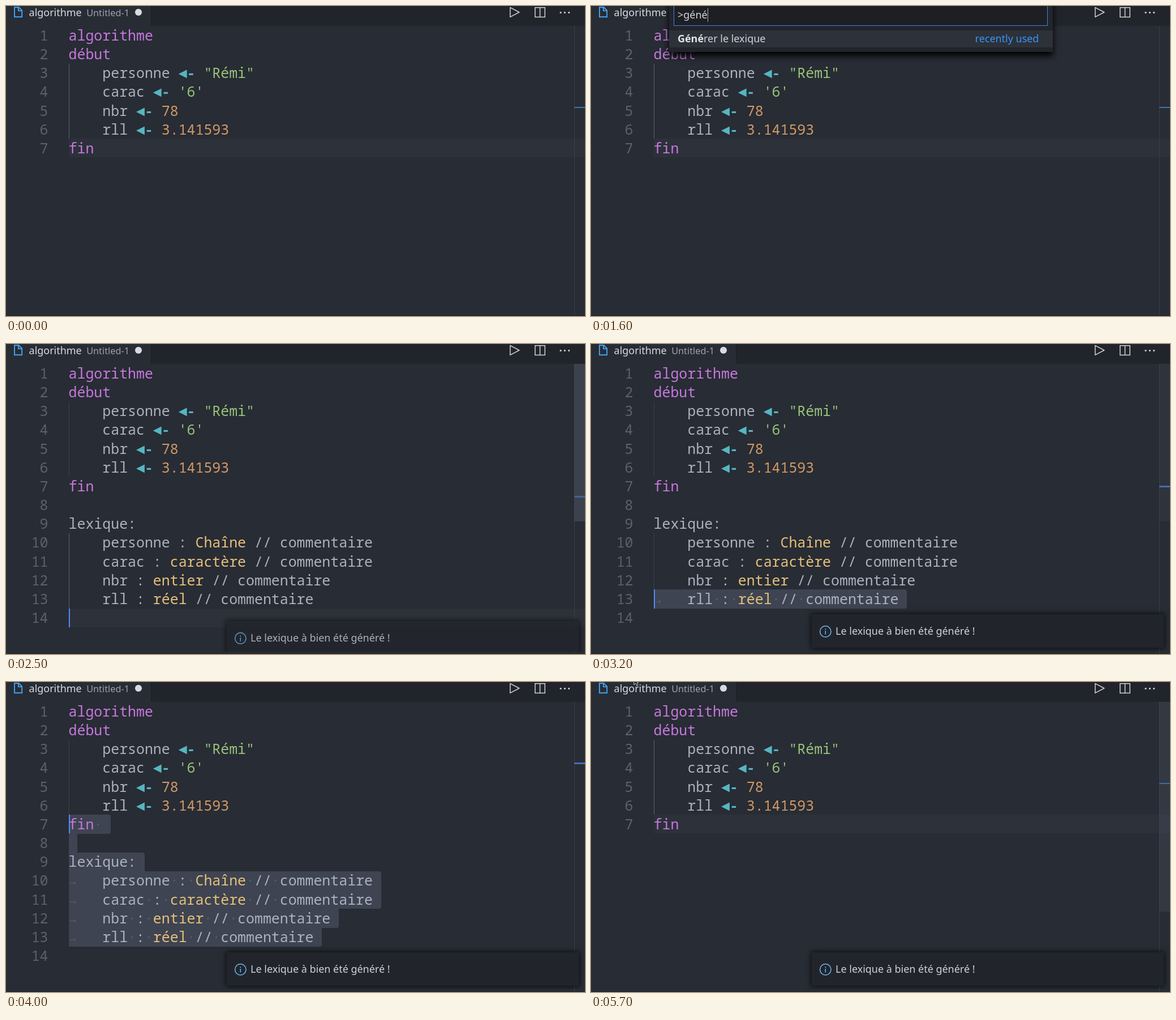
Write an HTML page that moves like this. It is 1023 px wide and 547 px high and loops after 5.8 s.

```html
<!DOCTYPE html>
<html lang="fr">
<head>
<meta charset="utf-8">
<title>Générer le lexique</title>
<style>
  html, body { margin: 0; width: 100%; height: 100%; overflow: hidden; background: #282c34; }
  body { position: relative; font: 17.97px/30.4px "Noto Sans", sans-serif; color: #d0d3d9; }
  div, svg { position: absolute; white-space: pre; }
  .bar { left: 256px; top: 0; right: 0; height: 35px; background: #21252b; border-left: 1px solid #1b1e23; }
  .title { left: 40.6px; top: -4.4px; color: #d7dae0; }
  .title small { font-size: 16.3px; color: #9da2ab; margin-left: 8.4px; }
  .dot { left: 228.4px; top: 5.2px; width: 11.6px; height: 11.6px; border-radius: 50%; background: #d9dbe0; }
  .icons { left: 0; top: 0; }

  #editor { inset: 0; }
  .code, .num { margin-top: -.4px; font: 24.88px/33.18px "Noto Sans Mono", "DejaVu Sans Mono", monospace; tab-size: 4; }
  .code { left: 110.6px; color: #abb2bf; }
  .num { left: 0; width: 74.5px; text-align: right; color: #5a6170; }
  .k { color: #c678dd; } .s { color: #98c379; } .n { color: #d19a66; } .t { color: #e5c07b; }
  .code b { color: #56b6c2; }
  .ws { color: rgba(255, 255, 255, .13); }
  .hl { left: 110.6px; right: 0; height: 33.2px; background: #2c313a; }
  .sel { height: 33.4px; background: #3e4451; }
  .guide { left: 110.6px; width: 1.3px; height: 132.8px; }
  #cursor { width: 2px; height: 33.2px; background: #528bff; }
  .ruler { left: 1004px; top: 35px; width: 1px; bottom: 0; background: #3a3f48; }
  #mark { left: 1004px; right: 0; height: 2.2px; background: #4270bd; }
  #slider { left: 1004px; right: 0; top: 35px; background: #4e5666; }
  .foot { left: 0; right: 0; bottom: 0; height: 1px; background: #1e2127; }

  #clip { left: 0; top: 0; width: 100%; height: 543px; overflow: hidden; }
  #toast { left: 390px; top: 477px; width: 622px; height: 59px; background: #21252b; box-shadow: 0 0 9px 1px rgba(0, 0, 0, .75); }
  #toast svg { left: 13px; top: 18.5px; }
  #toast div { left: 42.1px; top: 14.4px; color: #cfd2d8; }

  #palette { left: 138px; top: -20px; width: 678px; background: #21252b; box-shadow: 0 7px 11px #000; }
  .input { left: 8px; top: 0; width: 659px; height: 53px; background: #1d1f23; border: 1px solid #4c7be6; }
  #query { left: 15px; top: 20.2px; }
  #query::after { content: ""; display: inline-block; width: 1px; height: 24px; margin-right: -1px; vertical-align: -6px; background: #aeafad; }
  .row { left: 0; width: 678px; height: 30.4px; }
  .row.on { background: #2c313a; }
  .row > * { position: absolute; top: -.6px; }
  .row > span { left: 15px; }
  .row b { color: #e3e5ea; }
  .recent { right: 24.6px; color: #3c94f5; }
  .keys { right: 25px; height: 30.4px; display: flex; align-items: center; font-size: 15.2px; }
  .keys kbd { font: inherit; line-height: 22px; padding: 0 7px; border: 1px solid #2d3035; border-radius: 4px; background: #313439; }
  .keys i { font-style: normal; font-size: 17px; width: 17px; text-align: center; }
  #thumb { left: 664px; top: 62.6px; width: 14px; height: 30.4px; background: rgba(78, 86, 102, .22); }
</style>
</head>
<body>
<div class="bar"></div>
<div class="title">algorithme<small>Untitled-1</small></div>
<div class="dot"></div>
<svg class="icons" width="1023" height="35" fill="none" stroke="#cfd1d4" stroke-width="1.5">
  <path d="M15 2.2h7.6l5.6 5.6v11.4H15zM22 2.2v6.2h6.2" stroke="#42a5f5" stroke-width="1.9"/>
  <path d="M890.8 2.6v16.8L906.8 11z" stroke-linejoin="round"/>
  <path d="M934.8 2.7h17.4v16.8h-17.4zM943.5 2.7v16.8"/>
  <g fill="#cfd1d4" stroke="none"><circle cx="980" cy="11.6" r="1.6"/><circle cx="987.3" cy="11.6" r="1.6"/><circle cx="994.6" cy="11.6" r="1.6"/></g>
</svg>

<div id="editor"></div>
<div class="ruler"></div>
<div id="mark"></div>
<div id="slider"></div>
<div class="foot"></div>

<div id="clip"><div id="toast">
  <svg width="23" height="23" fill="none" stroke="#6cb6f5" stroke-width="1.5"><circle cx="11.3" cy="11.3" r="9.7"/><path d="M11.3 10v6.6M11.3 6.2v2"/></svg>
  <div>Le lexique à bien été généré !</div>
</div></div>

<div id="palette">
  <div class="input"></div>
  <div id="query"></div>
  <div id="thumb"></div>
</div>

<svg id="mouse" class="icons" width="100" height="10"><path d="M75-12 76 5l3-3 2 4.500 2-1-1.500-5 5.500-1.500z" fill="#15171b" stroke="#d8dade"/></svg>

<script>
const LOOP = 5800, TOP = 35.2, LH = 33.18, LEFT = 110.6, CH = 14.93, ROW = 30.4;
const $ = id => document.getElementById(id);
const editor = $('editor'), palette = $('palette');
const lineY = n => TOP + (n - 1) * LH;

function add(parent, cls, html = '', css = {}) {
  const el = document.createElement('div');
  el.className = cls;
  el.innerHTML = html;
  Object.assign(el.style, css);
  parent.append(el);
  return el;
}
const px = v => v + 'px';
const show = (el, on) => { el.style.display = on ? '' : 'none'; };

// Value of the last step that has begun
function at(t, steps) {
  let value = steps[0][1];
  for (const [start, v] of steps) if (t >= start) value = v;
  return value;
}

const assign = (name, cls, value) => `\t${name} <b>◄-</b> <span class="${cls}">${value}</span>`;
const entry = (name, type) => `\t${name} : <span class="t">${type}</span> // commentaire`;
const key = word => `<span class="k">${word}</span>`;
const source = [
  key('algorithme'), key('début'),
  assign('personne', 's', '"Rémi"'), assign('carac', 's', "'6'"),
  assign('nbr', 'n', '78'), assign('rll', 'n', '3.141593'),
  key('fin') + ' ', '', 'lexique:',
  entry('personne', 'Chaîne'), entry('carac', 'caractère'),
  entry('nbr', 'entier'), entry('rll', 'réel'), ''
];

const highlight = add(editor, 'hl');
const lines = source.map((html, i) => {
  const n = i + 1, top = px(lineY(n));
  const sel = add(editor, 'sel', '', { top });
  const ws = add(editor, 'code ws', '', { top });
  const text = add(editor, 'code', html, { top });
  const num = add(editor, 'num', n, { top });
  const plain = text.textContent;
  ws.textContent = [...plain].map(c => c === '\t' ? '→   ' : c === ' ' ? '·' : ' ').join('');
  return { n, sel, ws, text, num, cols: plain.replace('\t', '    ').length + 1 };
});
const guides = [3, 10].map(n => add(editor, 'guide', '', { top: px(lineY(n)) }));
const cursor = add(editor, '');
cursor.id = 'cursor';

const keys = combo => '<div class="keys">' +
  combo.split('+').map(k => `<kbd>${k}</kbd>`).join('<i>+</i>') + '</div>';
const rows = [
  ['Générer le lexique', '<div class="recent">recently used</div>'],
  ['Developer: Reload Window', keys('Ctrl+R')],
  ["Lancer l'algorithme", keys('Ctrl+Alt+L')],
  ['View: Debug Console', keys('Ctrl+Shift+Y')],
  ['Nalfy Attach Debugger', ''],
  ['Tasks: Open User Tasks', '']
].map(([label, extra], i) =>
  add(palette, i ? 'row' : 'row on', `<span>${label}</span>${extra}`, { top: px(62.6 + i * ROW) }));
palette.append($('thumb'));

// Caret: [time, line, column], no line when hidden
const caret = [
  [0], [600, 7, 4], [900], [2200, 7, 4], [2300, 14, 0], [3000], [3200, 13, 0],
  [3500, 11, 0], [3600, 9, 0], [3800, 8, 0], [4000, 7, 0], [4200, 7, 4], [4600],
  [4900, 7, 4], [5400]
].map(([t, line, col]) => [t, { line, col }]);
const activeLine = [[0, 7], [2300, 14], [3200, 13], [3500, 11], [3600, 9], [3800, 8], [4000, 7]];
const typed = [[0, ''], [1300, 'g'], [1400, 'gé'], [1500, 'gén'], [1600, 'géné']];
const sliderAlpha = [[0, 0], [2300, .5], [3000, .33], [3200, .16], [3500, 0], [5100, .5], [5400, .4], [5700, .3]];
const toastPose = [[0, [59, 0]], [2400, [38, .35]], [2500, [12, .8]], [3000, [0, 1]]];

function drawSelection(t, first) {
  const on = t >= 3200 && t < 4900;
  const start = t >= 4200 ? 4 : 0;
  const width = n => n < first || n > 13 ? 0 : lines[n - 1].cols;
  for (const { n, sel, ws, cols } of lines) {
    const inside = on && n >= first && n < 14;
    show(sel, inside);
    show(ws, inside);
    if (!inside) continue;
    const from = n === 7 ? start : 0;
    const r = round => round ? '4px' : '0';
    sel.style.left = px(LEFT + from * CH);
    sel.style.width = px((cols - from) * CH);
    sel.style.borderRadius = `${r(n === first)} ${r(cols > width(n - 1))} ${r(cols > width(n + 1))} ${r(n === 13)}`;
  }
}

function draw(t) {
  const long = t >= 2300 && t < 4900;
  const selecting = t >= 3200 && t < 4900;
  const current = at(t, activeLine);

  for (const { n, text, num } of lines) {
    show(text, long || n < 8);
    show(num, long || n < 8);
  }
  show(highlight, !selecting);
  highlight.style.top = px(lineY(current));
  drawSelection(t, current);

  const bright = '#5f636b', dim = '#3b4048';
  guides[0].style.background = long ? dim : bright;
  guides[1].style.background = selecting ? dim : bright;
  show(guides[1], long);

  const { line, col } = at(t, caret);
  show(cursor, line);
  if (line) {
    cursor.style.top = px(lineY(line));
    cursor.style.left = px(LEFT + col * CH);
  }

  $('mark').style.top = px(long ? 268.4 - (14 - current) * 18 : 178);
  $('slider').style.height = px(t < 4900 ? 278 : 370);
  $('slider').style.opacity = at(t, sliderAlpha);

  const [shift, alpha] = at(t, toastPose);
  $('toast').style.transform = `translateY(${shift}px)`;
  $('toast').style.opacity = alpha;

  const open = t >= 900 && t < 2200;
  show(palette, open);
  if (open) {
    const word = at(t, typed), k = word.length, full = k < 2;
    $('query').textContent = '>' + word;
    const label = 'Générer le lexique';
    rows[0].firstChild.innerHTML = `<b>${label.slice(0, k)}</b>${label.slice(k)}`;
    rows.forEach((row, i) => show(row, full || !i));
    show($('thumb'), full);
    palette.style.height = px(70.6 + ROW * (full ? 6 : 1));
  }
  show($('mouse'), t >= 5700);
}

function tick() {
  draw(performance.now() % LOOP);
  requestAnimationFrame(tick);
}
tick();
</script>
</body>
</html>
```
